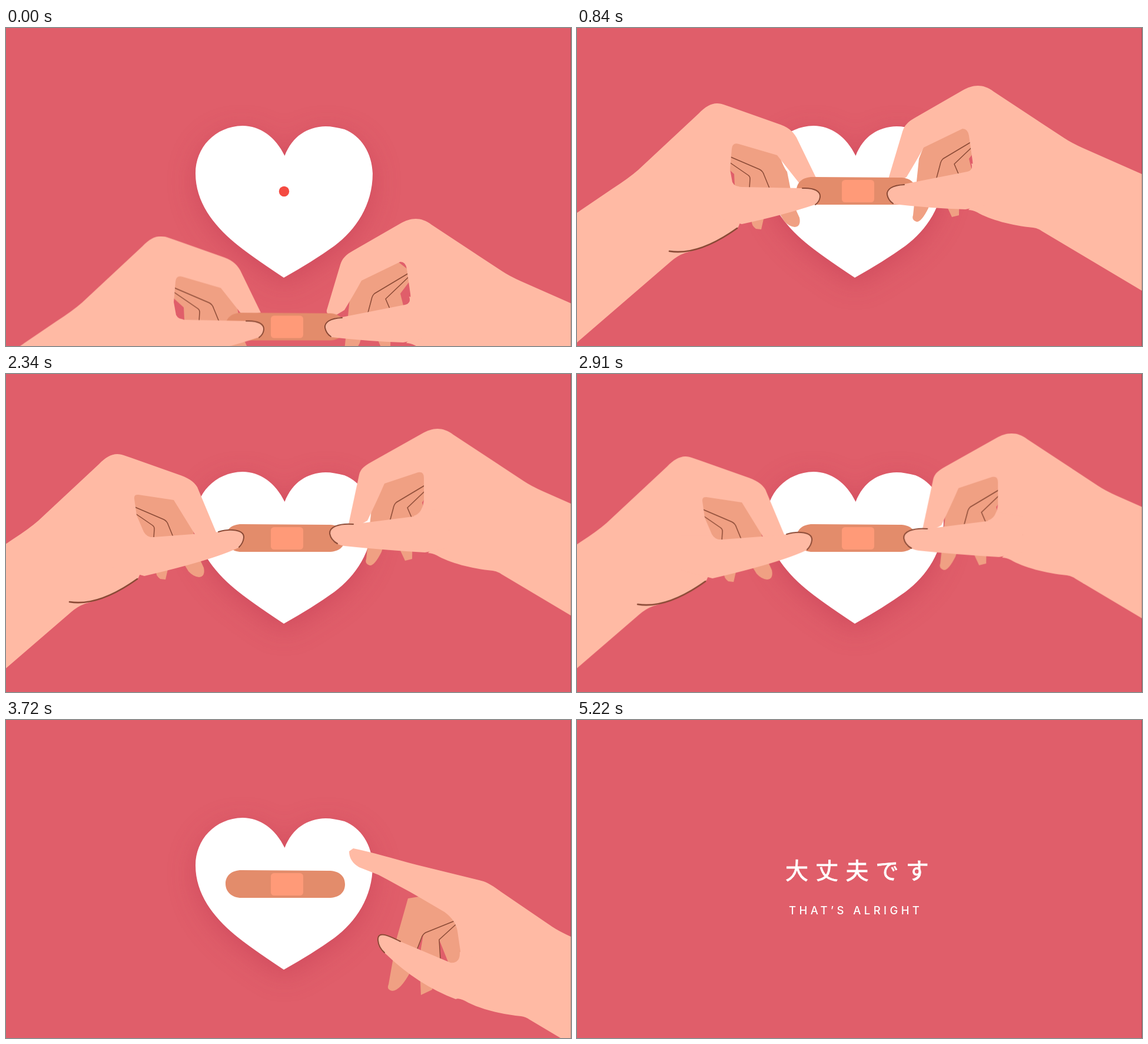
Animation, 960 px wide and 540 px high, one loop 6000 ms. Source, as an HTML page:

```html
<!DOCTYPE html>
<html lang="ja">
<head>
<meta charset="utf-8">
<title>大丈夫です</title>
<style>
html, body { margin: 0; width: 100%; height: 100%; overflow: hidden; background: #e05e6a; }
svg { display: block; width: 100vw; height: 100vh; }

.skin { fill: #ffbaa4; }
.shade { fill: #f0a083; }
.line { fill: none; stroke: #8a4a36; stroke-width: 1.5; stroke-linecap: round; stroke-linejoin: round; }
.nail { stroke-width: 2; }
.wrist { stroke-width: 2.6; }

.left, .right, .heart, .band, .fade, .text, [class*="pose"] { animation: 6s ease-in-out infinite; }
.left { animation-name: left; }
.right { animation-name: right; }
.heart { animation-name: pop; transform-origin: 472.5px 295px; }
.band { animation-name: band; transform-origin: 475px 278.5px; }
.fade { animation-name: fade; animation-timing-function: linear; }
.text { animation-name: text; transform-origin: 476px 283px; fill: #fff; }

.pose-lb { animation-name: l-body; }
.pose-lt { animation-name: l-thumb; }
.pose-ln { animation-name: l-nail; }
.pose-lf { animation-name: l-fingers; }
.pose-ls { animation-name: l-slide; }
.pose-rb { animation-name: r-body; }
.pose-rt { animation-name: r-thumb; }
.pose-rn { animation-name: r-nail; }
.pose-rf { animation-name: r-fingers; }
.pose-rs { animation-name: r-spread; }
.pose-rl { animation-name: r-lines; }

.ja { font: 400 39px "Noto Sans CJK JP", "Noto Sans CJK", sans-serif; letter-spacing: 12.2px; stroke: #fff; stroke-width: .9; }
.en { font: 500 18.5px Inter, sans-serif; letter-spacing: 5.4px; }

/* whole hands */
@keyframes left {
  0%, .4% { transform: translate(25px, 225.5px); animation-timing-function: cubic-bezier(.2,.6,.4,1); }
  6.33% { transform: translate(10px, -56px); animation-timing-function: cubic-bezier(.3,0,.4,1); }
  14% { transform: none; }
  17% { transform: translate(0, 4px); }
  21%, 25% { transform: translate(0, 2px); animation-timing-function: ease-in; }
  31.67% { transform: translate(-15px, 2px); animation-timing-function: ease-out; }
  39% { transform: translate(-49px, 8px); }
  52.5% { transform: translate(-55px, 13px); animation-timing-function: linear; }
  54% { transform: translate(-90px, 169px); animation-timing-function: ease-out; }
  59%, 100% { transform: translate(-150px, 470px); }
}
@keyframes right {
  0%, .4% { transform: translate(15px, 226px); animation-timing-function: cubic-bezier(.2,.6,.4,1); }
  6.33% { transform: translate(5px, -56px); animation-timing-function: cubic-bezier(.3,0,.4,1); }
  14% { transform: none; }
  17% { transform: translate(0, 4px); }
  21%, 25% { transform: translate(0, 2px); }
  31.67% { transform: translate(30px, -31px); }
  39% { transform: translate(52px, -5px); animation-timing-function: linear; }
  50% { transform: translate(58px, 4px); animation-timing-function: ease-in; }
  52.5% { transform: translate(68px, 34px); animation-timing-function: linear; }
  54% { transform: translate(86px, 74px); animation-timing-function: ease-out; }
  62%, 66% { transform: translate(100px, 164px); animation-timing-function: ease-in; }
  72% { transform: translate(236px, 279px); animation-timing-function: linear; }
  77%, 100% { transform: translate(460px, 480px); }
}

/* heart, plaster and words */
@keyframes pop {
  0%, 66.5% { transform: none; animation-timing-function: ease-out; }
  72.5%, 100% { transform: translate(-7px, -8.5px) scale(1.382); }
}
@keyframes band {
  0%, .4% { transform: translate(0, 228.5px); animation-timing-function: cubic-bezier(.2,.6,.4,1); }
  6.33% { transform: translate(0, -58px); animation-timing-function: cubic-bezier(.3,0,.4,1); }
  14% { transform: translate(0, -2px); }
  17% { transform: translate(0, 1px); }
  21%, 66.5% { transform: none; animation-timing-function: ease-out; }
  72.5%, 100% { transform: translate(0, -36px) scale(1.212); }
}
@keyframes fade {
  0%, 70% { opacity: 1; }
  73.6%, 100% { opacity: 0; }
}
@keyframes text {
  0%, 74% { opacity: 0; transform: scale(1.7); animation-timing-function: cubic-bezier(.1,.6,.3,1); }
  83%, 100% { opacity: 1; transform: none; }
}

/* left hand poses */
@keyframes l-body {
  0%, 25% { d: path("M-250 484L60 273Q88 255 104 241L207 145C222 130 234 124 252 131L340 162C358 168 366 174 373 186L408 258L378 264L340 216L275 197Q264 194 263 205L260 240L264 262Q266 269 275 269L290 300L274 338Q232 370 190 380Q174 384 160 396L0 534L-250 756Z"); }
  39%, 100% { d: path("M-250 484L60 273Q88 255 104 241L207 145C222 130 234 124 252 131L340 162C358 168 368 174 374 184L407 263L371 266L334 206L274 197Q266 196 267 204L271 232L283 260Q288 269 299 270L290 300L274 338Q232 370 190 380Q174 384 160 396L0 534L-250 756Z"); }
}
@keyframes l-thumb {
  0%, 25% { d: path("M264 262Q268 270 280 270L380 272C400 272 413 277 413 287C413 294 408 299 404 300Q350 318 280 333L230 320L230 262Z"); }
  39%, 100% { d: path("M280 262Q289 270 300 269L405 261C430 253 453 256 453 270C453 279 448 284 444 287Q400 308 284 335L230 320L230 262Z"); }
}
@keyframes l-nail {
  0%, 25% { d: path("M383 272C403 271 414 277 413 287Q412 295 405 300"); }
  39%, 100% { d: path("M410 260C430 254 454 256 453 270Q452 279 445 286"); }
}
@keyframes l-fingers {
  0%, .4% { transform: translate(10px, 1px); }
  14%, 25% { transform: none; }
  39%, 100% { transform: translate(7px, -1px); }
}
@keyframes l-slide {
  0%, 50% { transform: none; }
  54%, 100% { transform: translate(-12px, 1px); }
}

/* right hand poses: pinch, release, open, point, curl */
@keyframes r-body {
  0%, 25% { d: path("M1200 354L860 204Q840 195 828 187L708 108C690 94 672 96 655 106L575 152C562 159 556 166 553 176L530 253Q528 262 545 262L560 253C570 236 580 220 589 203L655 171Q664 171 666 183L672 225Q674 240 665 244L700 270L665 309Q672 309 680 313C700 325 740 336 775 339Q783 340 790 345L1200 589Z"); }
  39%, 50% { d: path("M1200 354L860 204Q840 195 828 187L708 108C690 94 672 96 655 106L573 152C558 160 550 166 548 176L530 260Q532 268 540 266L562 254C572 233 582 212 591 191L648 172Q658 170 658 181L658 218Q656 242 640 246L700 270L665 309Q672 309 680 313C700 325 740 336 775 339Q783 340 790 345L1200 589Z"); }
  54% { d: path("M1200 354L860 204Q840 195 828 187L740 127C724 115 712 109 700 107L574 90C554 88 524 87 494 83L489 89Q491 102 509 109L539 117C564 128 590 138 614 150L652 168Q664 176 667 194L671 224Q671 246 659 248L700 270L665 309Q672 309 680 313C700 325 740 336 775 339Q783 340 790 345L1200 589Z"); }
  62%, 66% { d: path("M1200 354L860 204Q840 195 828 187L740 127C724 115 714 110 704 108L598 82C560 72 520 60 490 54L483 59Q483 76 500 86L533 99C557 112 580 124 604 138L645 162Q664 176 667 194L672 228Q673 247 657 249L700 270L665 309Q672 309 680 313C700 325 740 336 775 339Q783 340 790 345L1200 589Z"); }
  72%, 100% { d: path("M1200 354L860 204Q840 195 828 187L740 127C724 115 714 110 704 107L634 87C600 76 575 84 501 109L487 116Q485 128 505 131L532 132C575 117 610 118 628 137L650 156Q669 171 670 191L672 228Q673 247 657 249L700 270L665 309Q672 309 680 313C700 325 740 336 775 339Q783 340 790 345L1200 589Z"); }
}
@keyframes r-thumb {
  0%, 25% { d: path("M670 230Q674 242 663 244L556 265C540 266 527 272 527 283C527 292 535 298 538 299Q600 306 660 308L700 300L700 240Z"); }
  39%, 50% { d: path("M655 232Q652 245 640 247L538 260C513 258 498 265 498 276C498 288 510 295 523 297Q590 304 660 308L700 300L700 240Z"); }
  54% { d: path("M670 228Q671 246 659 248L569 220C549 209 530 204 528 220C528 232 540 243 546 247Q610 290 674 310L700 300L700 240Z"); }
  62%, 100% { d: path("M671 230Q672 250 655 248L572 213C550 202 533 194 532 210C532 222 540 228 545 233Q600 286 664 310L700 300L700 240Z"); }
}
@keyframes r-nail {
  0%, 25% { d: path("M556 266C535 267 526 274 527 283Q529 293 537 298"); }
  39%, 50% { d: path("M538 260C513 258 497 265 498 276Q500 287 511 293"); }
  54% { d: path("M567 218C549 209 528 202 528 220Q530 232 541 241"); }
  62%, 100% { d: path("M570 212C550 202 531 193 532 210Q533 222 543 231"); }
}
@keyframes r-fingers {
  0%, .4% { transform: translate(-11px, 3px); }
  14%, 25% { transform: none; }
  39%, 50% { transform: translate(-11px, 1px); }
  54% { transform: translate(10px, 25px); }
  62%, 66% { transform: none; }
  72%, 100% { transform: translate(49px, 37px); }
}
@keyframes r-spread {
  0%, 50% { d: path("M600 173L657 164L684 185L684 190L622 222L612 256L597 306Q585 330 577 329Q568 326 571 318L581 222ZM622 222L684 190L641 231L650 252L649 318L637 321L630 306L612 256ZM641 231L684 185L690 190L666 222L672 246L650 256Z"); }
  54%, 100% { d: path("M583 139L650 128L680 150L670 182L609 201L599 224L588 262Q570 296 556 296Q546 294 550 285L564 206ZM609 201L670 178L636 209L638 242L624 294L605 303L604 280L605 224ZM636 209L670 176L690 190L690 250L652 249L652 249Z"); }
}
@keyframes r-lines {
  0%, 50% { d: path("M684 185L622 222Q618 226 617 232L610 258M684 190L641 231L650 252"); }
  54%, 100% { d: path("M670 174L613 197Q608 200 606 206L599 224M670 178L636 209L638 242"); }
}
</style>
</head>
<body>
<svg viewBox="0 0 960 540" preserveAspectRatio="none">
  <defs>
    <path id="heart" d="M473.5 217C458 185 432 166 402 166C355 167 322 203 322 247C322 295 352 334 389 365Q413 385 472 424Q522 396 558 370C594 343 623 301 623 247C622 212 603 183 575 172C563 169 553 167 543 167C512 168 487 183 473.5 217Z"/>
    <filter id="blur" x="-40%" y="-40%" width="180%" height="180%"><feGaussianBlur stdDeviation="23"/></filter>
  </defs>
  <rect width="960" height="540" fill="#e05e6a"/>

  <g class="heart">
    <g class="fade"><use href="#heart" y="12" fill="#c23a52" opacity=".5" filter="url(#blur)"/></g>
    <g class="fade"><path fill="#c23a52" opacity=".18" d="M324 255C330 205 360 181 393 181C430 181 450 212 474 216C500 212 525 183 563 182Q590 183 606 197C618 210 623 228 623 247C623 301 594 343 558 370Q522 396 472 424Q413 385 389 365C352 334 326 300 324 255Z"/></g>
    <use class="fade" href="#heart" fill="#fff"/>
    <circle class="fade" cx="472.5" cy="277.5" r="8.7" fill="#f44a41"/>
  </g>

  <g class="left">
    <g class="pose-lf">
      <path class="shade" d="M245 180L338 200Q350 236 357 244L368 300L378 322Q381 337 370 338Q360 337 352 328L335 300L318 320L313 342L304 341Q296 335 297 328L268 268L267 248L245 228Z"/>
      <path class="line" d="M240 210L310 240Q316 243 318 250L327 272M240 215L291 250Q294 252 294 256L293 272"/>
    </g>
    <path class="skin pose-lb"/>
    <path class="line wrist" d="M157 379Q206 387 272 340"/>
  </g>
  <g class="right">
    <g class="pose-rf">
      <path class="shade pose-rs"/>
      <path class="line pose-rl"/>
    </g>
    <path class="skin pose-rb"/>
  </g>

  <g class="band">
    <path class="fade" fill="#e38c6b" d="M400 255L548 256C565 256 576 264 576 279C576 294 565 302 548 302L400 302C384 302 373 292 373 278C373 264 384 255 400 255Z"/>
    <rect class="fade" x="450" y="260" width="55" height="38" rx="5.5" fill="#ff9a78"/>
  </g>

  <g class="left"><g class="pose-ls">
    <path class="skin pose-lt"/>
    <path class="line nail pose-ln"/>
  </g></g>
  <g class="right">
    <path class="skin pose-rt"/>
    <path class="line nail pose-rn"/>
  </g>

  <g class="text">
    <text class="ja" x="354" y="270">大丈夫です</text>
    <text class="en" x="360" y="329.5">THAT’S ALRIGHT</text>
  </g>
  <path d="M959.5 0V540" stroke="#000" stroke-opacity=".2"/>
</svg>
</body>
</html>
```
